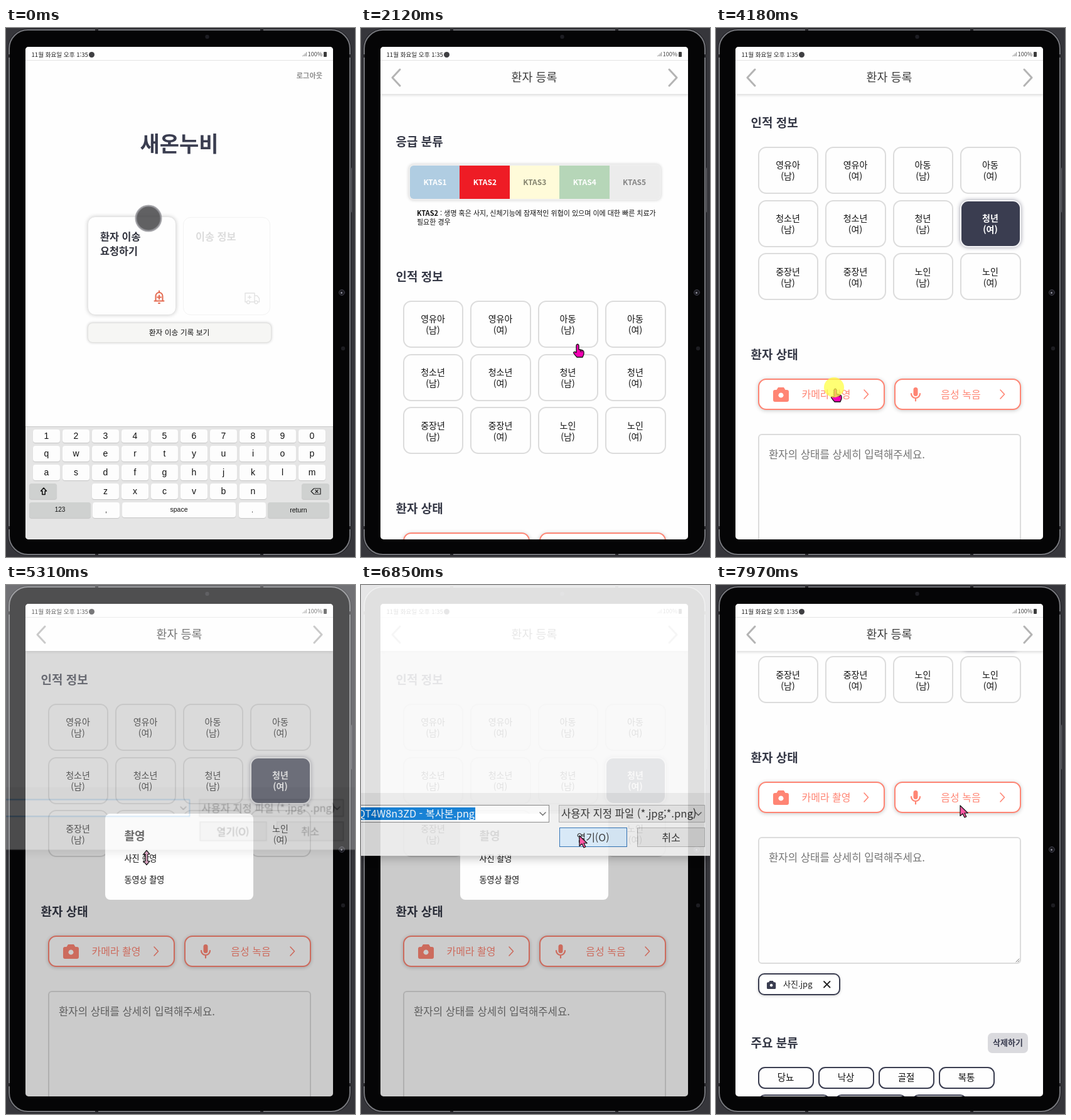
Write an HTML page that moves like this. It is 556 px wide and 842 px high and loops after 8 s.

```html
<!DOCTYPE html>
<html lang="ko">
<head>
<meta charset="utf-8">
<title>환자 등록</title>
<style>
html, body { margin: 0; width: 100%; height: 100%; overflow: hidden; background: #36363b; }
#stage { position: absolute; left: 0; top: 0; width: 556px; height: 842px; overflow: hidden;
  font-family: "Noto Sans CJK KR", "Noto Sans CJK", "Noto Sans", sans-serif; }
#stage div, #stage svg { position: absolute; box-sizing: border-box; }
#stage svg { overflow: visible; fill: none; stroke-linecap: round; stroke-linejoin: round; }
.layer { left: 0; top: 0; width: 556px; height: 842px; }
.t { white-space: pre; width: 500px; height: 30px; line-height: 30px; }
.key { font-family: "Liberation Sans", Arial, sans-serif; }
</style>
</head>
<body>
<div id="stage"></div>
<script>
const INK = '#3a3d50', CORAL = '#ff8574', LINE = '#dcdcdc';

function box(parent, x, y, w, h, css = '') {
  const d = document.createElement('div');
  d.style.cssText = `left:${x}px;top:${y}px;width:${w}px;height:${h}px;${css}`;
  parent.append(d);
  return d;
}
function layer(parent) {
  const d = document.createElement('div');
  d.className = 'layer';
  parent.append(d);
  return d;
}
// Text by its anchor x and vertical centre.
function text(parent, str, x, cy, size, weight, color, align = 'left') {
  const shift = { left: 0, center: 250, right: 500 }[align];
  const d = box(parent, x - shift, cy - 15 - size * 0.05, 500, 30,
    `font-size:${size}px;font-weight:${weight};color:${color};text-align:${align}`);
  d.style.width = d.style.height = '';
  d.className = 't';
  d.textContent = str;
  return d;
}
function art(parent, x, y, inner, css = '') {
  const holder = document.createElement('div');
  holder.innerHTML = `<svg width="1" height="1" style="left:${x}px;top:${y}px;${css}">${inner}</svg>`;
  const s = holder.firstChild;
  parent.append(s);
  return s;
}

const stage = document.getElementById('stage');

// Tablet
box(stage, 547, 222, 4, 72, 'background:#77777c;border-radius:2px');
box(stage, 4, 2, 545, 837, 'background:#050506;border:2px solid #77787d;border-radius:31px;box-shadow:0 0 0 1px #1c1c20');
for (const x of [142, 405]) for (const y of [1, 837]) box(stage, x, y, 5, 3, 'background:#2a2a2e');
for (const x of [3, 547]) for (const y of [42, 793]) box(stage, x, y, 3, 5, 'background:#2a2a2e');
art(stage, 0, 0, `<g fill="#1d1d22"><circle cx="320.500" cy="14" r="3.200"/><circle cx="537" cy="510" r="3.200"/>
  <circle cx="535" cy="421" r="4.500" stroke="#3c3c48"/></g><circle cx="534.500" cy="421.500" r="1.200" fill="#aab"/>`);

const screen = layer(stage);
screen.style.clipPath = 'inset(30px 35px 28px 31px round 5px)';
screen.style.background = '#fefefe';

// Home page
const home = layer(screen);
const logout = text(home, '로그아웃', 504, 76, 11.2, 700, '#8c8c8c', 'right');
logout.style.transformOrigin = '500px -10px';
const body = layer(home);
body.style.transformOrigin = '276px 51px';
text(body, '새온누비', 276, 185, 34, 900, INK, 'center');
const card = box(body, 130, 300, 141, 157, 'border-radius:12px;border:1px solid #e4e4e4');
const cardText = [text(body, '환자 이송', 150, 332, 16.3, 700), text(body, '요청하기', 150, 355, 16.3, 700)];
art(body, 234.5, 417, `<g stroke="#e3694f" stroke-width="2"><path d="M3.500 16.500V9.500a5.500 5.500 0 0 1 11 0v7M1.500 17.500h15M9 1.500v2M9 8.500v6M6 11.500h6M8 21h2"/></g>`);
box(body, 281.5, 300.5, 139.5, 156.5, 'border-radius:12px;border:1.5px solid #f2f2f2');
text(body, '이송 정보', 302, 332, 16.3, 700, '#dcdcdc');
art(body, 380, 420, `<g stroke="#e2e2e2" stroke-width="1.400"><path d="M3 16H1V2h15v14H9M16 6h4l3.500 4.500V16h-2M16 16h-1M8 6v5M5.500 8.500h5"/>
  <circle cx="6" cy="16.500" r="2.400"/><circle cx="18.500" cy="16.500" r="2.400"/></g>`);
box(body, 130, 469, 292.5, 32, 'background:#f6f6f4;border:1px solid #e2e2e0;border-radius:8px;box-shadow:0 0 4px rgba(0,0,0,.2)');
text(body, '환자 이송 기록 보기', 276, 485, 11.8, 500, '#111', 'center');

// Keyboard
const keys = layer(home);
box(keys, 31, 634, 490, 181, 'background:#e5e5e5;border-top:1px solid #c9c9c9');
function key(label, x, y, w, h, grey, size = 14) {
  const k = box(keys, x, y, w, h, `background:${grey ? '#cfd1d0' : '#fdfdfd'};border-radius:4px;box-shadow:0 1px 1px rgba(0,0,0,.14);
    text-align:center;line-height:${h - 1}px;font-size:${size}px;color:#111`);
  k.className = 'key';
  k.textContent = label;
}
['1234567890', 'qwertyuiop', 'asdfghjklm', '  zxcvbn'].forEach((row, r) => {
  [...row].forEach((c, i) => c !== ' ' && key(c, 43 + i * 47, r ? 635 + r * 30 : 639, 43, r ? 25 : 21));
});
key('', 37, 725, 44, 25, true);
key('', 471, 725, 44, 25, true);
key('123', 37, 755, 98, 25, true, 10);
key(',', 138, 755, 43, 25, false, 11);
key('space', 185, 755, 181, 24, false, 10.5);
key('.', 371, 755, 43, 25, false, 11);
key('return', 417, 755, 98, 25, true, 10.5);
art(keys, 60, 732, '<path d="M0 0l4.500 5h-2.300v5.500h-4.400V5h-2.300z" stroke="#111" stroke-width="1.500"/>');
art(keys, 486, 733, '<path d="M0 4.500L4.500 0H15v9H4.500zM7 2.500l4 4m0-4l-4 4" stroke="#222" stroke-width="1.200"/>');

// Registration page
const reg = layer(screen);
const page = layer(reg);
const heading = (p, s, y) => text(p, s, 55.5, y, 19, 700, '#353846');
heading(page, '응급 분류', 181);
box(page, 76, 217, 402, 57, 'background:#eee;border-radius:8px;box-shadow:0 0 5px rgba(0,0,0,.2)');
const bar = box(page, 78, 219, 398, 53, 'border-radius:6px;overflow:hidden');
let level2;
[['#b0cde2', '#fff'], ['#f8a4a8', '#fff'], ['#fffbd9', '#85846f'], ['#b6d6b8', '#fff'], ['#ececec', '#858585']].forEach(([bg, ink], i) => {
  const seg = box(bar, i * 79.4, 0, 80, 53, `background:${bg}`);
  if (i === 1) level2 = seg;
  text(page, 'KTAS' + (i + 1), 118 + i * 79.4, 246, 12, 700, ink, 'center');
});
const note = layer(page);
text(note, '', 89, 295, 11, 500, '#111').innerHTML =
  '<b>KTAS2</b> : 생명 혹은 사지, 신체기능에 잠재적인 위협이 있으며 이에 대한 빠른 치료가';
text(note, '필요한 경우', 89, 309, 11, 500, '#111');

const low = layer(page);
heading(low, '인적 정보', 396);
let chosen;
['영유아', '아동', '청소년', '청년', '중장년', '노인'].forEach((age, i) => ['남', '여'].forEach((sex, j) => {
  const x = 66.5 + ((i % 2) * 2 + j) * 107.5, y = 434 + (i >> 1) * 84.7;
  const cell = box(low, x, y, 96.5, 75, `border:2px solid ${LINE};border-radius:13px`);
  const lines = [text(low, age, x + 48, y + 29, 14, 500, '#111', 'center'), text(low, `(${sex})`, x + 48, y + 47, 14, 500, '#111', 'center')];
  if (age === '청년' && sex === '여') chosen = { cell, lines };
}));

const CAMERA = '<path fill-rule="evenodd" d="M8 0h9l2.500 4H22a3 3 0 0 1 3 3v13a3 3 0 0 1-3 3H3a3 3 0 0 1-3-3V7a3 3 0 0 1 3-3h2.500zM12.500 8.500a4 4 0 1 0 .01 0z"/>';
heading(low, '환자 상태', 765);
[[66.5, '카메라 촬영', 175.5, 239], [284, '음성 녹음', 390, 456]].forEach(([x, label, cx, ax]) => {
  box(low, x, 803, 202, 50, `border:2px solid ${CORAL};border-radius:13px;background:#fff;box-shadow:0 1px 6px rgba(0,0,0,.22)`);
  text(low, label, cx, 828, 16, 400, CORAL, 'center');
  art(low, ax - 3, 821, `<path d="M0 0l6.500 7-6.500 7" stroke="${CORAL}" stroke-width="1.600"/>`);
});
art(low, 90.5, 816.5, `<g fill="${CORAL}">${CAMERA}</g>`);
art(low, 310, 817, `<rect x="4.500" y="0" width="7" height="14" rx="3.500" fill="${CORAL}"/><path d="M1 10a7 7 0 0 0 14 0M8 17.500v4" stroke="${CORAL}" stroke-width="2.200"/>`);
box(low, 66.5, 891, 419.5, 202, `border:2px solid ${LINE};border-radius:6px`);
text(low, '환자의 상태를 상세히 입력해주세요.', 84, 924, 16.7, 400, '#757575');
art(low, 478, 1085, '<path d="M0 5l5-5M3 5l2-2" stroke="#777"/>');

const chip = layer(low);
box(chip, 66.5, 1108, 131, 35, `border:2px solid ${INK};border-radius:10px;background:#fff;box-shadow:0 1px 4px rgba(0,0,0,.2)`);
art(chip, 81, 1119.5, `<g fill="${INK}" transform="scale(.57)">${CAMERA}</g>`);
text(chip, '사진.jpg', 107, 1126, 13, 400, '#222');
art(chip, 171.5, 1121, '<path d="M0 0l9.500 9.500m0-9.500L0 9.500" stroke="#222" stroke-width="1.800"/>');
heading(low, '주요 분류', 1219);
box(low, 433, 1203, 64, 32, 'background:#dadade;border-radius:7px');
text(low, '삭제하기', 465, 1219, 13, 700, INK, 'center');
const tag = (x, y, w) => box(low, x, y, w, 35, `border:2px solid ${INK};border-radius:11px`);
['당뇨', '낙상', '골절', '복통'].forEach((s, i) => {
  tag(66.5 + i * 96, 1257, 89);
  text(low, s, 111 + i * 96, 1274, 14.5, 500, '#111', 'center');
});
[[66.5, 115], [189, 115], [312, 88]].forEach(([x, w]) => tag(x, 1301, w));

const sheet = layer(reg);
box(sheet, 31, 51, 490, 763, 'background:rgba(0,0,0,.2)');
box(sheet, 158, 364, 236, 137, 'background:#fefefe;border-radius:8px');
text(sheet, '촬영', 188.5, 399, 18, 700, '#333');
text(sheet, '사진 촬영', 188.5, 436, 13.1, 500, '#111');
text(sheet, '동영상 촬영', 188.5, 470, 13.1, 500, '#111');

box(reg, 31, 51, 490, 54, 'background:#fefefe;box-shadow:0 2px 4px rgba(0,0,0,.14)');
text(reg, '환자 등록', 276, 78, 18.4, 400, '#3c3c3c', 'center');
art(reg, 0, 0, '<path d="M62 66L50 79l12 13M491 66l12 13-12 13" stroke="#b4b4b4" stroke-width="3"/>');

// Status bar
box(screen, 31, 30, 490, 22, 'background:#fefefe;border-bottom:1px solid #e4e4e4');
text(screen, '11월 화요일 오후 1:35', 40.5, 42, 9.6, 300, '#222');
box(screen, 132, 37.5, 9, 9, 'border-radius:50%;background:#3f3f42');
text(screen, '100%', 504, 42, 9, 400, '#444', 'right');
art(screen, 472, 38, '<path d="M.5 7V6M2.500 7V4.500M4.500 7V2.500M6.500 7V.5" stroke="#888" stroke-linecap="butt"/>');
box(screen, 506, 38, 5, 8, 'background:#3c3c3c;border-radius:1px');

// File picker
const picker = layer(stage);
picker.style.transformOrigin = '-300px -400px';
box(picker, -700, -500, 1300, 931, 'background:#fff;box-shadow:0 2px 16px rgba(0,0,0,.35)');
box(picker, -700, 331, 1300, 100, 'background:#f0f0f0');
const field = box(picker, -400, 350, 700, 28, 'background:#fff;border:1px solid #7a7a7a');
const fileName = layer(picker);
box(fileName, -100, 354, 281.5, 20, 'background:#0078d7');
text(fileName, 'hQT4W8n3ZD - 복사본.png', 181, 364, 16.2, 400, '#fff', 'right');
box(picker, 315, 350, 233, 28, 'background:#e3e3e3;border:1px solid #adadad');
text(picker, '사용자 지정 파일 (*.jpg;*.png)', 319, 364, 16.6, 400, '#222');
for (const x of [285, 533]) art(picker, x, 362, '<path d="M0 0l4.500 4.500L9 0" stroke="#555" stroke-width="1.300"/>');
const open = box(picker, 315.5, 386, 108, 31);
text(picker, '열기(O)', 369.5, 402, 16, 400, '#222', 'center');
box(picker, 440, 386, 107.5, 31, 'background:#e1e1e1;border:1px solid #adadad');
text(picker, '취소', 494, 402, 16, 400, '#222', 'center');

// Pointers, each with its hot spot at the origin
const pointer = layer(stage);
const shapes = {
  dot: '<circle r="20" fill="rgba(72,72,74,.86)" stroke="rgba(150,151,156,.8)" stroke-width="3"/>',
  arrow: '<path d="M0 0V16.500L4 13l3 6 2.800-1.300L7 12h5.200z" fill="#ff5aa5" stroke="#111" stroke-width="1.200"/>',
  hand: `<path d="M-2 2Q0-1.500 2 2V8.500L8 10Q10 10.600 10 13V16Q9 18.500 8 21H-1Q-4 18-6.500 14Q-6 11-2 13.500Z" fill="#f600b4" stroke="#111" stroke-width="1.300"/>
    <path d="M4.500 9.500v3M7 10.200v2.800" stroke="#111"/>`,
  resize: '<path d="M0-11.500L5-5.500H1.800V5.500H5L0 11.500L-5 5.500H-1.800V-5.500H-5z" fill="#d9a3c0" stroke="#222" stroke-width="1.200"/>',
};
for (const k in shapes) shapes[k] = art(pointer, 0, 0, shapes[k]);
const glow = art(pointer, -2, -2, '<circle r="16" fill="rgba(255,255,70,.75)"/>');

// Motion tables: [time, value...]
const PATH = [[0, 227, 303], [330, 157, 441], [464, 157, 441], [730, 194, 400], [1190, 194, 400], [1600, 197, 250],
  [1720, 197, 250], [2050, 316, 465], [2125, 345, 503], [2450, 445, 561], [3050, 445, 561], [3650, 317, 424],
  [3910, 190, 574], [4380, 190, 574], [4700, 233, 412], [5040, 233, 412], [5180, 224, 434], [5580, 224, 434],
  [5650, 110, 165], [5710, 24, 188], [5790, 24, 188], [5990, 18, 196], [6120, 18, 196], [6580, 348, 399],
  [7100, 348, 399], [7570, 389, 351]];
const KIND = [[0, 'dot'], [830, 'arrow'], [1450, 'hand'], [1750, 'arrow'], [1980, 'hand'], [3250, 'arrow'], [3800, 'hand'],
  [4210, 'arrow'], [4620, 'hand'], [5150, 'resize'], [5620, 'arrow']];
const CLICKS = [1660, 2850, 4180, 5040, 5910, 6775];
const GROW = [[464, 0], [530, 0.12], [600, 0.4], [664, 0.65], [730, 0.822], [797, 1]];
const PRESS = [[464, 0], [730, 1]];
const SCROLL = [[3110, 0], [3500, 245], [7370, 245], [7570, 367], [7830, 367], [7968, 490]];
const FADE = [[5110, 0, 0.975], [5180, 0.06, 0.98], [5312, 0.3, 0.988], [5510, 1, 1.008], [6773, 1, 1.008], [6839, 0.88, 1], [7040, 0, 0.97]];

const smooth = u => u * u * (3 - 2 * u);
function at(table, t, ease = u => u) {
  if (t <= table[0][0]) return table[0].slice(1);
  for (let i = 1; i < table.length; i++) {
    const a = table[i - 1], b = table[i];
    if (t < b[0]) {
      const u = ease((t - a[0]) / (b[0] - a[0]));
      return a.slice(1).map((v, k) => v + (b[k + 1] - v) * u);
    }
  }
  return table[table.length - 1].slice(1);
}
const show = (el, on) => { el.style.display = on ? '' : 'none'; };
const mix = (a, b, u) => `rgb(${a.map((v, i) => Math.round(v + (b[i] - v) * u))})`;

const STEP = 66.4, LOOP = 8000;
function draw(time) {
  const t = Math.floor((time % LOOP + 15) / STEP) * STEP;

  const onHome = t < 840;
  show(home, onHome);
  show(reg, !onHome);
  const [grow] = at(GROW, t), [press] = at(PRESS, t);
  const scale = `scale(${(583 + 180 * grow) / 583})`;
  body.style.transform = logout.style.transform = scale;
  keys.style.transform = `translateY(${180 * grow}px)`;
  card.style.background = mix([254, 254, 254], [236, 238, 238], press);
  card.style.boxShadow = `0 0 ${6 + press}px rgba(0,0,0,${0.2 + 0.2 * press})`;
  for (const c of cardText) c.style.color = mix([50, 52, 63], [255, 255, 255], press);

  const rated = t > 1690;
  level2.style.background = rated ? '#ee1c25' : '#f8a4a8';
  show(note, rated);
  low.style.transform = rated ? '' : 'translateY(-37px)';
  const picked = t > 2890;
  chosen.cell.style.background = picked ? INK : '';
  chosen.cell.style.borderColor = picked ? '#f4f4f6' : LINE;
  chosen.cell.style.boxShadow = picked ? '0 0 6px rgba(30,30,60,.45)' : '';
  for (const l of chosen.lines) { l.style.color = picked ? '#fff' : '#111'; l.style.fontWeight = picked ? 700 : 500; }
  page.style.transform = `translateY(${-at(SCROLL, t, smooth)[0]}px)`;
  show(sheet, t > 4215 && t < 7090);
  show(chip, t > 7090);

  const [alpha, zoom] = at(FADE, t);
  show(picker, alpha > 0);
  picker.style.opacity = alpha;
  picker.style.transform = `scale(${zoom})`;
  const named = t > 5940, hot = t > 6480;
  show(fileName, named);
  field.style.borderColor = named ? '#7a7a7a' : '#0078d7';
  open.style.cssText += `;background:${hot ? '#d3e6f6' : '#e1e1e1'};border:1px solid ${hot ? '#1b64ad' : '#adadad'}`;

  const [x, y] = at(PATH, t, smooth);
  pointer.style.transform = `translate(${x}px,${y}px)`;
  const kind = KIND.filter(k => k[0] <= t).pop()[1];
  for (const k in shapes) show(shapes[k], k === kind);
  show(glow, CLICKS.some(c => Math.abs(t - c) < 33));
}

const start = performance.now();
function tick() {
  draw(performance.now() - start);
  requestAnimationFrame(tick);
}
tick();
</script>
</body>
</html>
```
